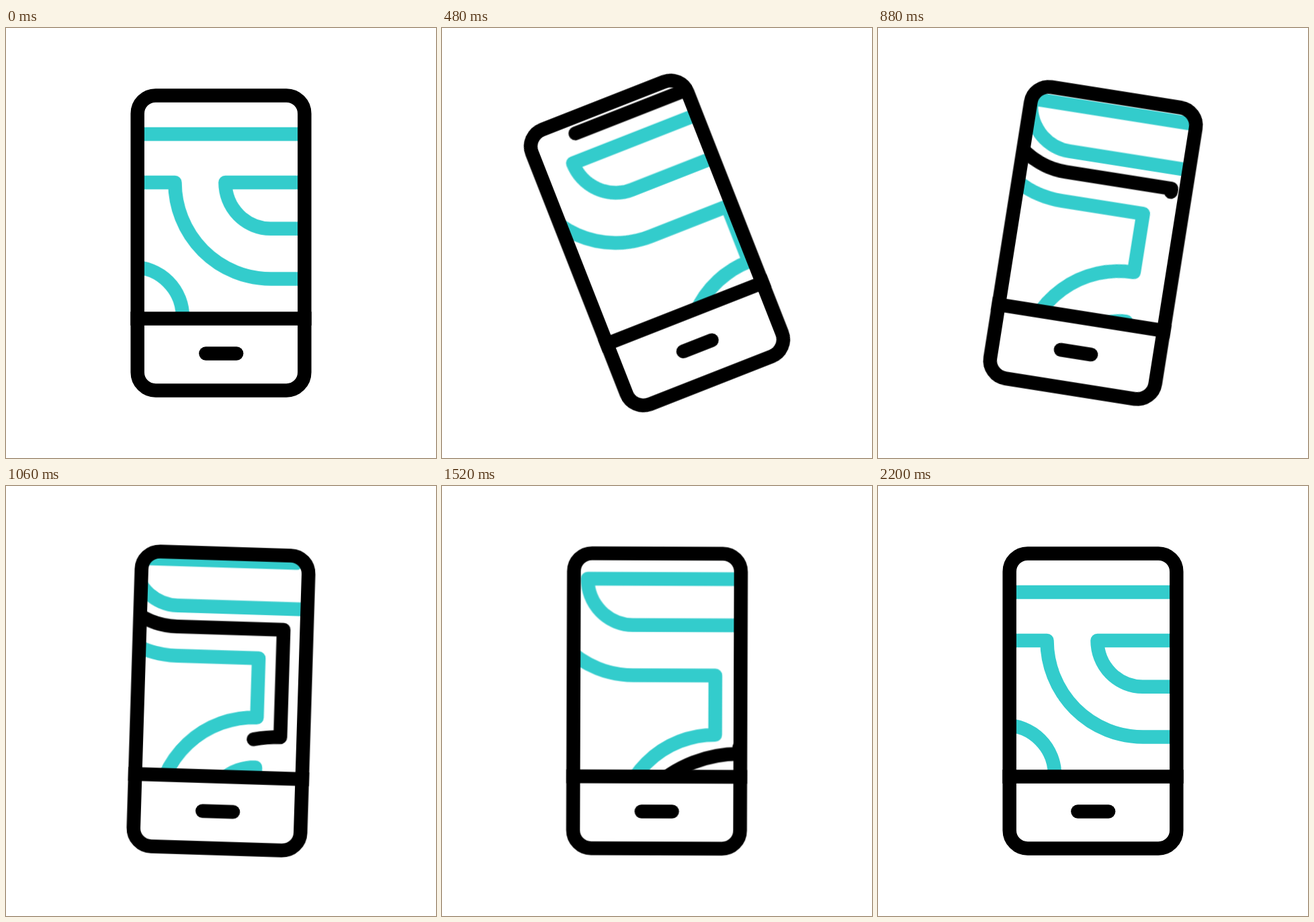
Write an HTML page that moves like this. It is 640 by 640 pixels and loops after 2.4 s.

```html
<!DOCTYPE html>
<html lang="en">
<head>
<meta charset="utf-8">
<title>Phone navigation</title>
<style>
  html, body { margin: 0; width: 100%; height: 100%; overflow: hidden; background: #fff; }
  svg { display: block; width: 100vw; height: 100vh; }
  path, rect, circle { fill: none; stroke-width: 20.5; stroke-linecap: round; stroke-linejoin: round; }
  .body, .route { stroke: #000; }
  .streets { stroke: #3cc; }
  clipPath rect { stroke: none; }

  .phone {
    transform-origin: 320px 320px;
    animation: tilt 2400ms cubic-bezier(.333, 0, .667, 1) infinite;
  }
  .map { animation: pan 2400ms infinite; }
  .route {
    stroke-dasharray: 547 4000;
    animation: drive 2400ms linear infinite;
  }

  @keyframes tilt {
    0% { transform: rotate(0deg); }
    22.917% { transform: rotate(-22.4deg); }
    38.333% { transform: rotate(10deg); }
    49.375% { transform: rotate(-5deg); }
    58.333% { transform: rotate(2deg); }
    64.583%, 100% { transform: rotate(0deg); }
  }
  @keyframes pan {
    0% { transform: translate(0, 0); animation-timing-function: cubic-bezier(0, 0, .69, 1); }
    46.667% { transform: translate(-144px, -119.8px); animation-timing-function: cubic-bezier(.41, 0, .78, 1); }
    91.667%, 100% { transform: translate(0, 0); }
  }
  @keyframes drive {
    from { stroke-dashoffset: 547; }
    to { stroke-dashoffset: -2052; }
  }
</style>
</head>
<body>
<svg viewBox="0 0 640 640">
  <clipPath id="screen"><path d="M195.7 432V127a27 27 0 0 1 27-27H417.3a27 27 0 0 1 27 27V432Z"/></clipPath>
  <g class="phone">
    <g clip-path="url(#screen)">
      <g class="map">
        <g class="streets">
          <path d="M170 158H640"/>
          <path d="M170 230H251.5A143 143.5 0 0 0 394.5 373.5H517V461.7A144 144 0 0 0 373 605.7"/>
          <path d="M620 298.7H394A67.5 68.7 0 0 1 326.5 230H569"/>
          <path d="M517 605.5V536A69.5 69.5 0 0 0 447.5 605.5"/>
          <circle cx="189" cy="430" r="74"/>
        </g>
        <path class="route" d="M867 190H281V217A113 113 0 0 0 394 330H552.7V490A185 185 0 0 0 367.7 675"/>
      </g>
    </g>
    <g class="body">
      <rect x="195.7" y="100.4" width="248.6" height="439" rx="27"/>
      <path d="M195.6 432.5H444.4" style="stroke-linecap: square"/>
      <path d="M297.4 484.4H343.1"/>
    </g>
  </g>
</svg>
</body>
</html>
```
